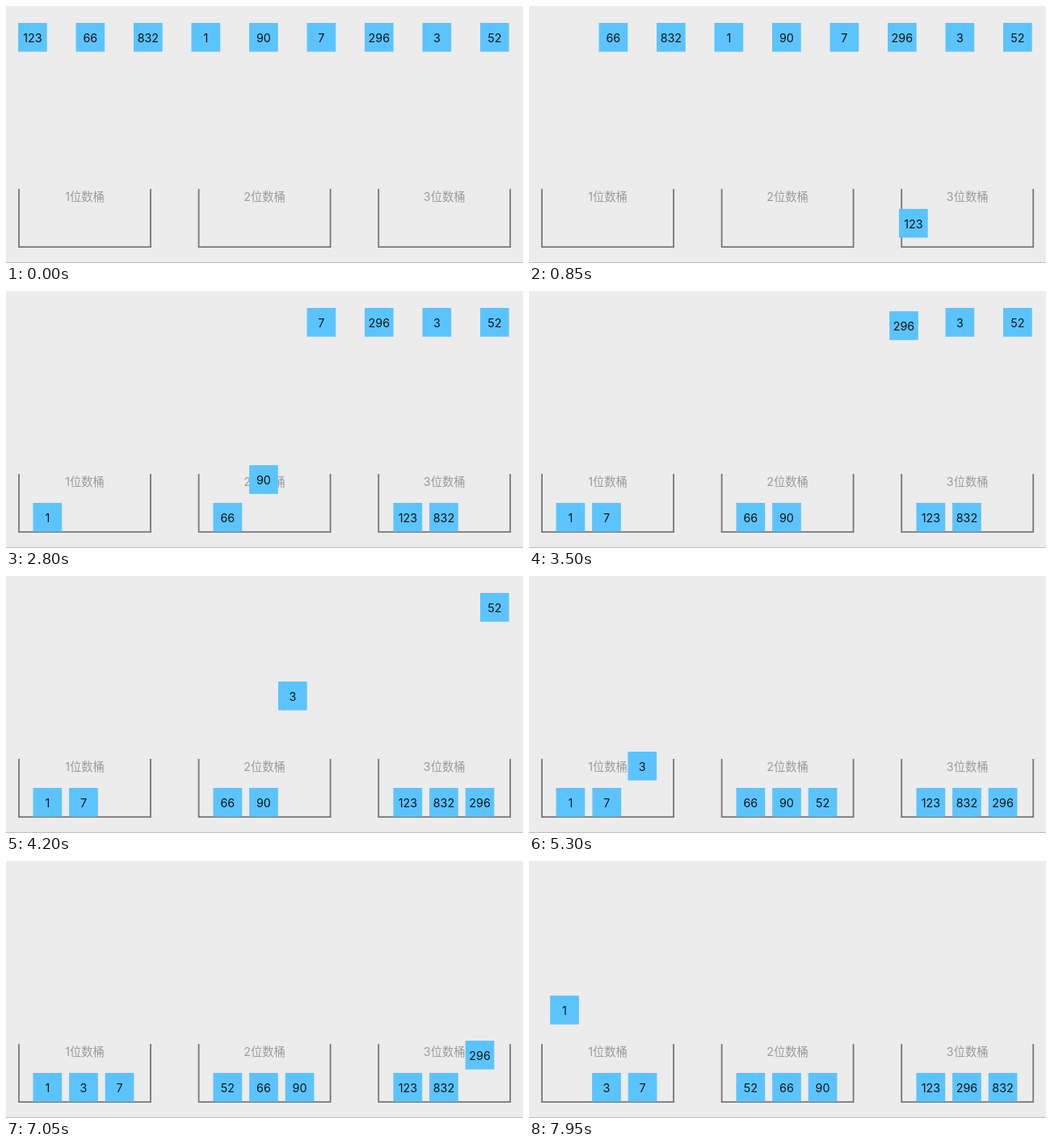
These frames come from a looping animation (640x319 px, 8 s). An HTML page with a canvas:

```html
<!DOCTYPE html>
<html lang="zh-CN">
<head>
<meta charset="utf-8">
<title>桶排序</title>
<style>
  html, body { margin: 0; width: 100%; height: 100%; overflow: hidden; background: #ececec; }
  canvas { display: block; }
</style>
</head>
<body>
<canvas id="stage" width="640" height="319"></canvas>
<script>
const ctx = document.getElementById('stage').getContext('2d');
const LOOP = 8000, STEP = 50;
const SIZE = 35.7, TOP = 21, FLOOR = 263, LIFTED = 218;
const FLY = 500, FLY_PERIOD = 506.5;
const SHIFT = 300, SHIFT_PERIOD = 306.2;
const FONT = '14.3px Inter, "Noto Sans CJK SC", "Noto Sans CJK", sans-serif';

const rowX = i => 15 + 71.5 * i;
const slotX = (bucket, slot) => 33.5 + 223 * bucket + 44.6 * slot;
const swing = t => 0.5 - Math.cos(Math.PI * t) / 2;

const tiles = [123, 66, 832, 1, 90, 7, 296, 3, 52].map((value, i) =>
  ({ value, x: rowX(i), y: TOP, moves: [] }));

// Each move starts where the tile's previous one ended.
function move(tile, start, duration, x, y) {
  const last = tile.moves.at(-1);
  const from = last ? last.to : tile;
  tile.moves.push({ start, duration, from: { x: from.x, y: from.y }, to: { x, y } });
}

function buildTimeline() {
  const buckets = [[], [], []];
  let time = 419;

  // Drop every tile into the bucket for its digit count.
  for (const tile of tiles) {
    const b = String(tile.value).length - 1;
    move(tile, time, FLY, slotX(b, buckets[b].length), FLOOR);
    buckets[b].push(tile);
    time += FLY_PERIOD;
  }

  // In each bucket, insert the last tile at its sorted place.
  buckets.forEach((bucket, b) => {
    const picked = bucket.pop();
    const place = bucket.filter(tile => tile.value < picked.value).length;
    const x = slotX(b, place);
    move(picked, time, SHIFT, slotX(b, bucket.length), LIFTED);
    time += SHIFT_PERIOD;
    move(picked, time, SHIFT, x, LIFTED);
    bucket.forEach((tile, i) => {
      if (i >= place) move(tile, time, SHIFT, slotX(b, i + 1), FLOOR);
    });
    time += SHIFT_PERIOD;
    move(picked, time, SHIFT, x, FLOOR);
    time += SHIFT_PERIOD;
    bucket.splice(place, 0, picked);
  });

  // Start collecting the sorted tiles back into the row.
  move(buckets[0][0], time, FLY, rowX(0), TOP);
}

function positionAt(tile, time) {
  const current = tile.moves.filter(m => m.start <= time).at(-1);
  if (!current) return tile;
  const { start, duration, from, to } = current;
  const p = swing(Math.min(1, (time - start) / duration));
  return { x: from.x + (to.x - from.x) * p, y: from.y + (to.y - from.y) * p };
}

function drawBucket(b) {
  const left = 16 + 222.6 * b, right = left + 163;
  ctx.strokeStyle = '#777';
  ctx.lineWidth = 1.8;
  ctx.beginPath();
  ctx.moveTo(left, 227);
  ctx.lineTo(left, 299.2);
  ctx.lineTo(right, 299.2);
  ctx.lineTo(right, 227);
  ctx.stroke();
  ctx.fillStyle = '#9b9b9b';
  ctx.fillText(`${b + 1}位数桶`, left + 81.5, 242);
}

function drawTile(tile, time) {
  const { x, y } = positionAt(tile, time);
  ctx.fillStyle = '#5bc4ff';
  ctx.fillRect(x, y, SIZE, SIZE);
  ctx.fillStyle = '#111';
  ctx.fillText(tile.value, x + SIZE / 2, y + 23.8);
}

function draw(now) {
  const time = Math.floor((now % LOOP) / STEP) * STEP;
  ctx.fillStyle = '#ececec';
  ctx.fillRect(0, 0, 640, 319);
  ctx.fillStyle = '#bdbdbd';
  ctx.fillRect(0, 318, 640, 1);
  ctx.font = FONT;
  ctx.textAlign = 'center';
  [0, 1, 2].forEach(drawBucket);
  tiles.forEach(tile => drawTile(tile, time));
}

function frame() {
  draw(performance.now());
  requestAnimationFrame(frame);
}

buildTimeline();
frame();
</script>
</body>
</html>
```
